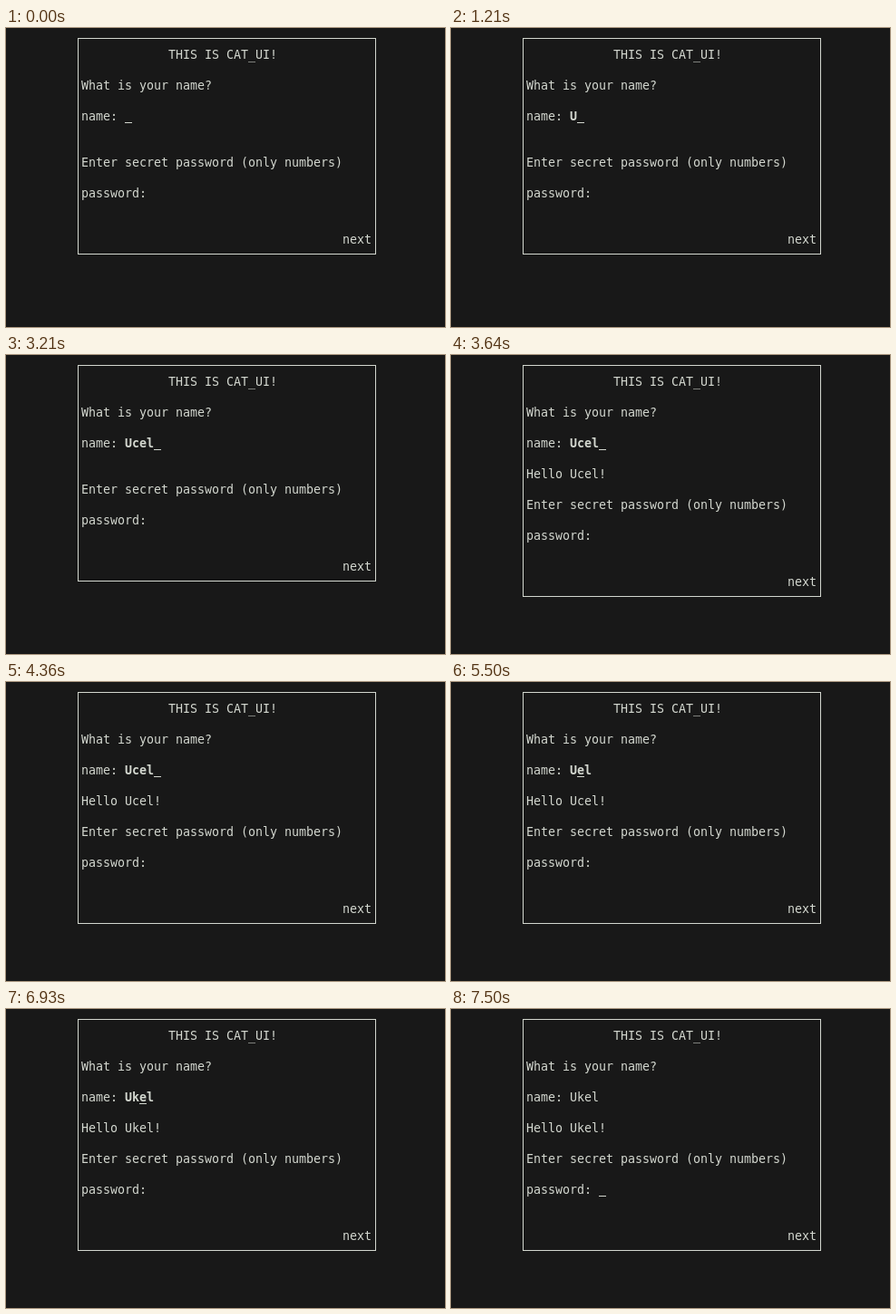
Write an HTML page that moves like this. It is 484 px wide and 330 px high and loops after 8 s.

```html
<!DOCTYPE html>
<html lang="en">
<head>
<meta charset="utf-8">
<title>Terminal form</title>
<style>
  html, body {
    margin: 0;
    width: 100%;
    height: 100%;
    overflow: hidden;
    background: #181818;
  }
  svg { display: block; }
  text {
    font: 13.333px "DejaVu Sans Mono", monospace;
    letter-spacing: calc(8px - 1ch);
    fill: #d3d7cf;
    white-space: pre;
  }
  .bold { font-weight: bold; }
  #box { fill: none; stroke: #d3d7cf; }
  #cursor { fill: #d3d7cf; }
</style>
</head>
<body>
<svg width="484" height="330" viewBox="0 0 484 330">
  <rect id="box" x="79.5" y="11.5" width="328" height="238"/>
  <text x="179" y="34">THIS IS CAT_UI!</text>
  <text x="83" y="68">What is your name?</text>
  <text x="83" y="102">name:</text>
  <text id="name" x="131" y="102"></text>
  <text id="hello" x="83" y="136"></text>
  <g id="lower">
    <text x="83" y="153">Enter secret password (only numbers)</text>
    <text x="83" y="187">password:</text>
    <text x="371" y="238">next</text>
  </g>
  <rect id="cursor" width="8" height="1"/>
</svg>
<script>
  const LOOP = 8000, CELL = 8, ROW = 17;
  const $ = id => document.getElementById(id);
  const box = $('box'), nameText = $('name'), hello = $('hello');
  const lower = $('lower'), cursor = $('cursor');

  // start time, typed name, cursor column, greeted name, password focused
  const steps = [
    [0, '', 0],
    [1070, 'U', 1],
    [1930, 'Uc', 2],
    [2360, 'Uce', 3],
    [2930, 'Ucel', 4],
    [3640, 'Ucel', 4, 'Ucel'],
    [4640, 'Ucel', 3, 'Ucel'],
    [4790, 'Ucel', 2, 'Ucel'],
    [5500, 'Uel', 1, 'Ucel'],
    [6070, 'Ukel', 2, 'Ucel'],
    [6930, 'Ukel', 2, 'Ukel'],
    [7500, 'Ukel', 0, 'Ukel', true]
  ];
  let shown;

  function draw([, name, column, greeted, password]) {
    const shift = greeted ? ROW : 0;
    nameText.textContent = name;
    nameText.classList.toggle('bold', !password);
    hello.textContent = greeted ? `Hello ${greeted}!` : '';
    lower.setAttribute('transform', `translate(0 ${shift})`);
    box.setAttribute('height', 238 + shift);
    cursor.setAttribute('x', (password ? 163 : 131) + column * CELL);
    cursor.setAttribute('y', password ? 189 + shift : 104);
  }

  function tick() {
    const time = performance.now() % LOOP;
    const step = steps.findLast(s => s[0] <= time);
    if (step !== shown) draw(shown = step);
    requestAnimationFrame(tick);
  }
  tick();
</script>
</body>
</html>
```
